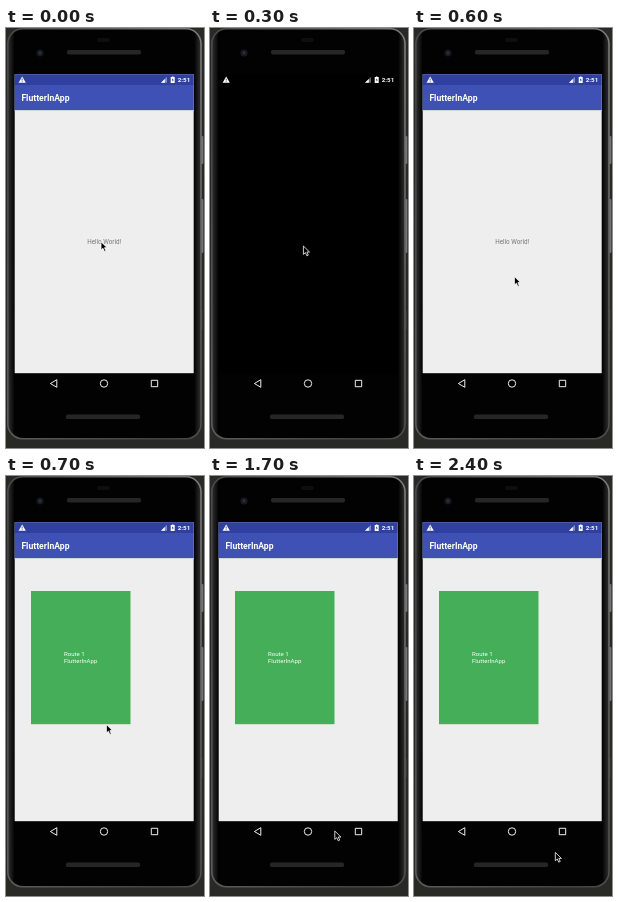
These frames come from a looping animation (198 px wide and 420 px high, 2500 ms). An HTML page:

```html
<!DOCTYPE html>
<html lang="en">
<head>
<meta charset="utf-8">
<title>Phone demo</title>
<style>
  html, body { margin: 0; width: 100%; height: 100%; overflow: hidden; background: #292a25; }
  svg { display: block; width: 198px; height: 420px; }
  text { font-family: Roboto, Arial, sans-serif; }
  .bold { font-weight: 700; fill: #fff; }
</style>
</head>
<body>
<svg viewBox="0 0 198 420">
  <defs>
    <linearGradient id="edge" x1="0" y1="1" x2="1" y2="0">
      <stop offset="0" stop-color="#5c5c5c"/>
      <stop offset=".4" stop-color="#424242"/>
      <stop offset="1" stop-color="#7c7c7c"/>
    </linearGradient>
    <linearGradient id="body">
      <stop offset="0" stop-color="#303030"/>
      <stop offset=".022" stop-color="#141414"/>
      <stop offset=".035" stop-color="#020202"/>
      <stop offset=".965" stop-color="#020202"/>
      <stop offset=".978" stop-color="#141414"/>
      <stop offset="1" stop-color="#303030"/>
    </linearGradient>
  </defs>

  <!-- body -->
  <g fill="#747474">
    <rect x="195" y="108" width="2.4" height="28" rx="1"/>
    <rect x="195" y="171" width="2.4" height="54" rx="1"/>
    <rect x="195" y="282" width="1.6" height="20" rx=".8" fill="#3c3c3c"/>
  </g>
  <rect x="1.8" y=".8" width="193.2" height="410" rx="15" fill="url(#body)" stroke="url(#edge)" stroke-width="1.6"/>
  <rect x="91" y="10" width="13" height="4" rx="2" fill="#0e0e0f"/>
  <rect x="61" y="22" width="74" height="4.4" rx="1.6" fill="#262626"/>
  <rect x="60" y="386.6" width="74" height="4.4" rx="1.6" fill="#262626"/>
  <circle cx="34" cy="25" r="3.6" fill="#17181b"/>
  <circle cx="34" cy="25" r="1.4" fill="#2b3350"/>

  <!-- screen -->
  <rect x="8.7" y="46.2" width="179" height="299" fill="#000"/>
  <g id="app">
    <rect x="8.7" y="46.2" width="179" height="299" fill="#eee"/>
    <rect x="8.7" y="46.2" width="179" height="10.8" fill="#3040a0"/>
    <rect x="8.7" y="57" width="179" height="25" fill="#3f51b5"/>
    <rect x="8.7" y="82" width="179" height="1" fill="#d4d4d8"/>
    <text class="bold" x="15.4" y="72.9" font-size="8.65">FlutterInApp</text>
    <text id="hello" x="81.2" y="215.8" font-size="6.3" fill="#777">Hello World!</text>
    <g id="card" fill="#fff" font-size="6.1">
      <rect x="25" y="115" width="99.5" height="133.2" fill="#44af58"/>
      <text x="58" y="180.2">Route 1</text>
      <text x="58" y="187.2">FlutterInApp</text>
    </g>
  </g>

  <!-- status icons -->
  <g fill="#fff">
    <path d="M16.2 48.6 19.8 54.8H12.6Z"/>
    <path d="M16.2 50.6V52.6M16.2 53.3V54.1" stroke="#303a70" stroke-width=".8"/>
    <path d="M155 54.8 161 48.8V54.8Z" opacity=".4"/>
    <path d="M155 54.8 158.8 51V54.8Z"/>
    <path d="M165.9 48.4H167.5V49.1H168.7V54.9H164.7V49.1H165.9Z"/>
    <path d="M167 50.2 165.7 52.3H166.6V53.8L167.8 51.7H167Z" fill="#303a70"/>
  </g>
  <text class="bold" x="171.8" y="54.2" font-size="6.2">2:51</text>

  <!-- navigation -->
  <g fill="none" stroke="#eee" stroke-linejoin="round">
    <path d="M50.8 351.7V359.3L44.4 355.5Z"/>
    <circle cx="98" cy="355.5" r="3.7"/>
    <rect x="145.3" y="352.3" width="6.4" height="6.4"/>
  </g>

  <path id="cursor" d="M0 0V8.4L2 6.6 3.4 9.8 4.9 9.1 3.5 6H6.1Z" stroke="#fff" stroke-width=".8" stroke-linejoin="round"/>
</svg>
<script>
  const LOOP = 2500, STEP = 100;
  const get = id => document.getElementById(id);
  const show = (id, on) => get(id).setAttribute("visibility", on ? "inherit" : "hidden");

  // The hand rests at a few stops and eases between them.
  const stops = [
    { t: 0, x: 95, y: 213.7 },
    { t: 300, x: 93.4, y: 218 },
    { t: 400, x: 100.4, y: 248.6 },
    { t: 900, x: 100.4, y: 248.6 },
    { t: 1500, x: 102.6, y: 346 },
    { t: 1900, x: 147, y: 364 },
    { t: 2100, x: 149, y: 346 },
    { t: 2400, x: 141.3, y: 376.4 }
  ];
  const smooth = k => k * k * (3 - 2 * k);

  function hand(t) {
    const i = Math.max(1, stops.findIndex(s => s.t >= t));
    const a = stops[i - 1], b = stops[i];
    const k = smooth((t - a.t) / (b.t - a.t));
    return [a.x + (b.x - a.x) * k, a.y + (b.y - a.y) * k];
  }

  function draw() {
    const t = Math.floor(performance.now() % LOOP / STEP) * STEP;
    show("app", t !== 300);
    show("hello", t < 700);
    show("card", t >= 700);
    get("cursor").setAttribute("transform", `translate(${hand(t)})`);
    requestAnimationFrame(draw);
  }
  draw();
</script>
</body>
</html>
```
